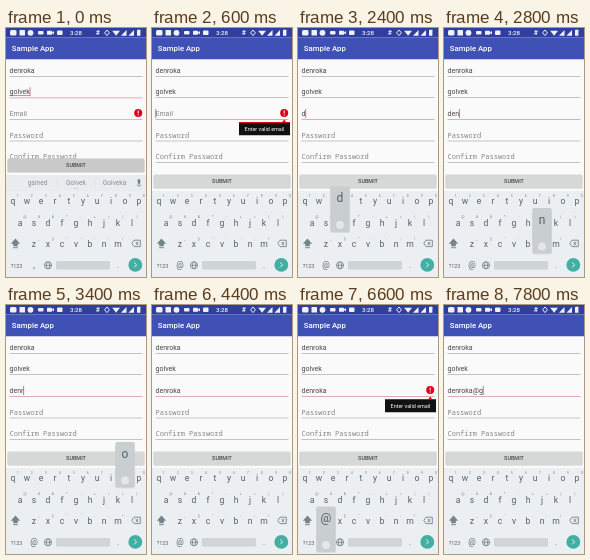
Write an HTML page with a canvas that moves like this. It is 140 px wide and 249 px high and loops after 8 s.

```html
<!DOCTYPE html>
<html lang="en">
<head>
<meta charset="utf-8">
<title>Form validation</title>
<style>
html, body { margin: 0; height: 100%; overflow: hidden; background: #fafafa; }
canvas { display: block; width: 100vw; height: 100vh; }
</style>
</head>
<body>
<canvas></canvas>
<script>
const W = 140, H = 249, LOOP = 8000, STEP = 200;
const canvas = document.querySelector('canvas');
const ctx = canvas.getContext('2d');
const SANS = 'Roboto, sans-serif', MONO = '"Noto Sans Mono", "DejaVu Sans Mono", monospace';
const INK = '#484848', HINT = '#858585', KEY = '#536067', ICON = '#75838b';
const ACCENT = '#dd8fa5', CURSOR = '#b0596f', RED = '#e0001b';

// time, email text, pressed key
const typing = [
  [0, '', ''], [2400, 'd', 'd'], [2600, 'de', 'e'], [2800, 'den', 'n'], [3000, 'den', ''],
  [3200, 'denr', 'r'], [3400, 'denr', 'o'], [3600, 'denro', 'k'], [3800, 'denrok', 'a'],
  [4000, 'denroka', ''], [6600, 'denroka', '@'], [6800, 'denroka@', ''],
  [7600, 'denroka@', 'g'], [7800, 'denroka@g', '']
];

const rows = [
  { keys: 'qwertyuiop', hints: '1234567890', x: 7, y: 173 },
  { keys: 'asdfghjkl', hints: '@#&*-+=()', x: 14, y: 194.5 },
  { keys: 'zxcvbnm', hints: '_$"\':;/', x: 28, y: 216 }
];
const keyPos = { '@': [28, 237.5] };
for (const r of rows) [...r.keys].forEach((k, i) => keyPos[k] = [r.x + i * 14, r.y]);

const within = (t, a, b) => t >= a && t < b;

function rect(x, y, w, h, color, radius = 0) {
  ctx.fillStyle = color;
  ctx.beginPath();
  ctx.roundRect(x, y, w, h, radius);
  ctx.fill();
}

function circle(x, y, r, color) {
  ctx.fillStyle = color;
  ctx.beginPath();
  ctx.arc(x, y, r, 0, 7);
  ctx.fill();
}

function shape(points, color) {
  ctx.beginPath();
  points.forEach(p => ctx.lineTo(...p));
  ctx.fillStyle = color;
  ctx.fill();
}

function outline(points, color, width = .7, closed = true) {
  ctx.beginPath();
  points.forEach(p => ctx.lineTo(...p));
  if (closed) ctx.closePath();
  ctx.lineWidth = width;
  ctx.strokeStyle = color;
  ctx.stroke();
}

function text(s, x, y, size, color, align = 'left', weight = 400, family = SANS) {
  ctx.font = `${weight} ${size}px ${family}`;
  ctx.textAlign = align;
  ctx.fillStyle = color;
  ctx.fillText(s, x, y);
  return ctx.measureText(s).width;
}

function statusBar() {
  rect(0, 0, W, 9.4, '#303f9f');
  const white = '#f0f1fa';
  rect(4, 2, 6.5, 5.5, white, 1.5);
  rect(13.5, 2, 5.5, 5.5, white, .5);
  circle(24.5, 4.8, 2.9, white);
  rect(32, 3, 5.5, 3.6, white, 1);
  rect(41, 2.8, 5, 4, white, .5);
  shape([[45.5, 4.8], [48, 3], [48, 6.6]], white);
  rect(51, 2.4, 5.5, 4.6, white, 1);
  text('3:28', 70, 7.2, 6.2, white, 'center', 500);
  text('#', 92, 7.4, 7.2, white, 'center', 700);
  outline([[101, 2], [103.4, 4.8], [101, 7.6], [98.6, 4.8]], white, 1);
  shape([[106.2, 2.8], [114, 2.8], [110.1, 7.8]], white);
  shape([[120.5, 2], [120.5, 7.7], [115, 7.7]], white);
  shape([[128, 2], [128, 7.7], [122.5, 7.7]], white);
  rect(131, 1.8, 3.4, 6, white, .4);
}

function field(i, value, hint, focused, cursorOn, mono) {
  const y = 44.7 + i * 21.6;
  const width = value
    ? text(value, 3.5, y, 7, INK)
    : (text(hint, 3.5, y, 7, HINT, 'left', 400, mono ? MONO : SANS), 0);
  rect(3.5, y + 3.3, 133, focused ? .7 : .5, focused ? ACCENT : '#8d8d8d');
  if (focused && cursorOn) rect(3.4 + width, y - 7, .8, 9, CURSOR);
  return width;
}

function submitButton(y, pressed) {
  rect(1.6, y + .6, 136.8, 13.4, '#c8c8c8', 1);
  rect(1.6, y, 136.8, 13.3, pressed ? '#c9c9c9' : '#d6d7d7', 1);
  text('SUBMIT', 70, y + 8.6, 5.45, INK, 'center', 500);
}

function errorIcon() {
  circle(132.2, 85, 4, RED);
  rect(131.7, 82.5, 1, 3.1, '#fff');
  rect(131.7, 86.4, 1, 1, '#fff');
}

function tooltip() {
  shape([[130, 94.5], [132.2, 91.5], [134.4, 94.5]], RED);
  rect(87, 94, 51, 13.3, '#111');
  rect(87, 94, 51, 1.1, RED);
  text('Enter valid email', 112.5, 103, 5.45, '#fff', 'center');
}

function keyboard(emailMode) {
  rect(0, 163, W, 86, '#eceff1');
  for (const r of rows) [...r.keys].forEach((k, i) => {
    const x = r.x + i * 14;
    text(k, x, r.y + 3, 8.6, KEY, 'center');
    text(r.hints[i], x + 4.8, r.y - 4.2, 3.6, ICON, 'center');
  });
  shape([[9.5, 210.5], [14.2, 215.7], [11.8, 215.7], [11.8, 218.2], [7.2, 218.2], [7.2, 215.7], [4.8, 215.7]], ICON);
  rect(7.2, 219.2, 4.6, 1, ICON);
  outline([[125.8, 215.4], [128, 212.2], [134.3, 212.2], [134.3, 218.6], [128, 218.6]], ICON, .9);
  text('×', 131, 217.7, 6.4, ICON, 'center', 700);
  text('?123', 10.5, 239.5, 5.4, KEY, 'center');
  text(emailMode ? '@' : ',', 28, 240, 8.4, KEY, 'center');
  ctx.strokeStyle = ICON;
  ctx.lineWidth = .8;
  ctx.beginPath();
  ctx.arc(42, 237.3, 3.6, 0, 7);
  ctx.ellipse(42, 237.3, 1.6, 3.6, 0, 0, 7);
  ctx.moveTo(38.4, 237.3);
  ctx.lineTo(45.6, 237.3);
  ctx.stroke();
  rect(50, 233, 54, 8.4, '#cfd4d7', .8);
  text('.', 112, 239.5, 8, KEY, 'center');
  circle(129.3, 236.9, 6.9, '#43aea2');
  outline([[128.2, 234.5], [130.6, 236.9], [128.2, 239.3]], '#fff', .9, false);
}

function suggestions() {
  rect(0, 147, W, 16.2, '#e9ecee');
  ['gained', 'Golvek', 'Golveka'].forEach((word, i) =>
    text(word, 31.5 + i * 38.5, 157.2, 6.6, '#849098', 'center'));
  for (const x of [68.5, 70, 71.5]) circle(x, 160.3, .4, ICON);
  rect(50.5, 151.5, .4, 7, '#d3d8db');
  rect(89.5, 151.5, .4, 7, '#d3d8db');
  rect(131.7, 151, 2.6, 5, ICON, 1.3);
  rect(130.7, 156.7, 4.6, .7, ICON);
  rect(132.6, 157, .8, 2, ICON);
}

function keyPopup(key) {
  const [x, y] = keyPos[key];
  rect(x - 9.7, y - 35.6, 19.6, 46, 'rgba(0,0,0,.08)', 2);
  rect(x - 9.7, y - 36, 19.4, 45.6, '#c9ced1', 2);
  text(key, x, y - 20.5, 12, KEY, 'center');
  circle(x, y + 2.6, 4, 'rgba(255,255,255,.5)');
}

function draw(t) {
  const [, email, key] = typing.findLast(e => e[0] <= t);
  const onSurname = t < 200, suggesting = t < 400;
  const blinkStart = t < 2400 ? 500 : t < 6800 ? 3900 : 6700;
  const cursorOn = within(t, 2400, 4000) || t < 600 || (t - blinkStart) % 1000 < 500;
  const showError = t < 2400 || within(t, 5400, 6800);

  rect(0, 0, W, H, '#fafafa');
  statusBar();
  rect(0, 9.4, W, 21.8, '#3f51b5');
  text('Sample App', 5.8, 23.2, 7.8, '#fff', 'left', 500);

  field(0, 'denroka');
  const surnameWidth = field(1, 'golvek', '', onSurname, true);
  if (onSurname) rect(3.5, 67.3, surnameWidth, .5, INK);
  field(2, email, 'Email', !onSurname, cursorOn);
  field(3, '', 'Password', false, false, true);
  field(4, '', 'Confirm Password', false, false, true);

  submitButton(suggesting ? 130.6 : 146.6, onSurname || within(t, 5000, 5400));
  if (showError) errorIcon();
  if (showError && t >= 600) tooltip();
  keyboard(!suggesting);
  if (suggesting) suggestions();
  if (key) keyPopup(key);
}

function resize() {
  const ratio = devicePixelRatio || 1;
  canvas.width = Math.round(innerWidth * ratio);
  canvas.height = Math.round(innerHeight * ratio);
  ctx.setTransform(canvas.width / W, 0, 0, canvas.height / H, 0, 0);
}

function tick() {
  const t = performance.now() % LOOP;
  draw(Math.floor(t / STEP) * STEP);
  requestAnimationFrame(tick);
}

addEventListener('resize', resize);
resize();
tick();
</script>
</body>
</html>
```
